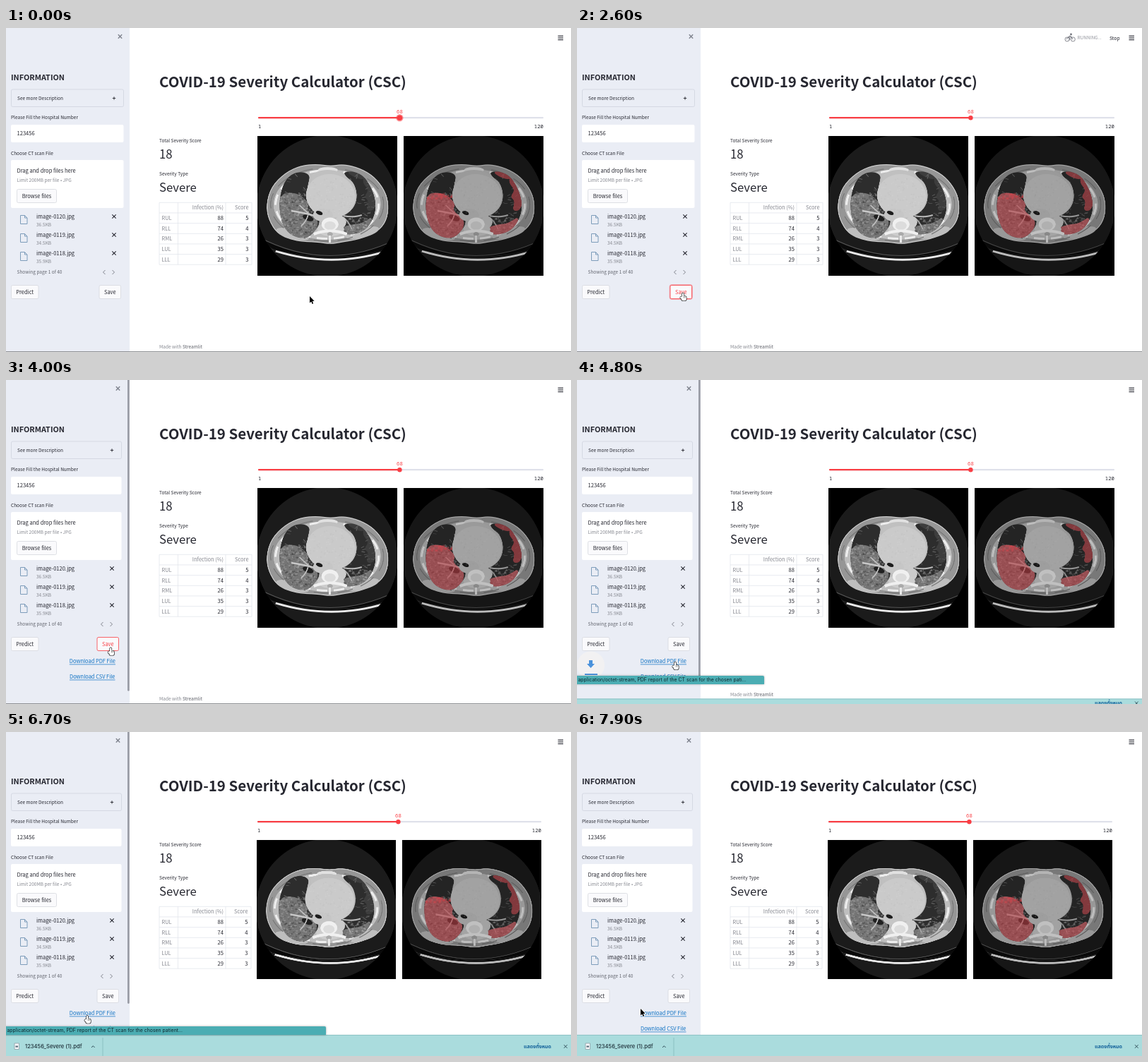
An HTML page with a canvas for the animation above (8000 ms loop, 800 by 459 pixels).

```html
<!DOCTYPE html>
<html lang="en">
<head>
<meta charset="utf-8">
<title>Severity calculator</title>
<style>
html, body { margin: 0; width: 100%; height: 100%; overflow: hidden; background: #fff; }
canvas { display: block; width: 800px; height: 459px; }
</style>
</head>
<body>
<canvas id="stage"></canvas>
<script>
const W = 800, H = 459, LOOP = 8000, STEP = 100;
const SANS = '"Noto Sans CJK JP","Noto Sans CJK SC","Noto Sans CJK","Open Sans",sans-serif';
const MONO = '"Noto Sans Mono","Liberation Mono",monospace';
const UI = 'Inter,Roboto,sans-serif';
const INK = '#262730', MUTED = '#85878f', RED = '#f93e44', LINK = '#0a6fc2', LINE = '#e3e6ec';
const CJK = 1.118; // Latin glyphs of the CJK face are drawn larger than nominal

const stage = document.getElementById('stage');
const dpr = window.devicePixelRatio || 1;
stage.width = W * dpr;
stage.height = H * dpr;
const c = stage.getContext('2d');

const clamp = v => Math.max(0, Math.min(1, v));
const ease = v => { v = clamp(v); return v * v * (3 - 2 * v); };
const part = (t, from, to) => clamp((t - from) / (to - from));

function text(s, x, y, size = 7.3, color = INK, o = {}) {
  const family = o.family || SANS;
  c.font = `${o.weight || 400} ${family === SANS ? size / CJK : size}px ${family}`;
  c.textAlign = o.align || 'left';
  c.fillStyle = color;
  c.fillText(s, x, y + size * 0.33);
  return c.measureText(s).width;
}

function rect(x, y, w, h, fill, stroke, r = 0) {
  c.beginPath();
  c.roundRect(x, y, w, h, r);
  if (fill) { c.fillStyle = fill; c.fill(); }
  if (stroke) { c.strokeStyle = stroke; c.lineWidth = 0.8; c.stroke(); }
}

function lines(color, width, ...paths) {
  c.strokeStyle = color;
  c.lineWidth = width;
  c.beginPath();
  for (const p of paths)
    for (let i = 0; i < p.length; i += 2) c[i ? 'lineTo' : 'moveTo'](p[i], p[i + 1]);
  c.stroke();
}

function dot(x, y, r, fill) {
  c.beginPath();
  c.arc(x, y, r, 0, 7);
  c.fillStyle = fill;
  c.fill();
}

function cross(x, y, r, color, width = 1.2) {
  lines(color, width, [x - r, y - r, x + r, y + r], [x + r, y - r, x - r, y + r]);
}

// ---- chest slices, painted once in a 198 x 198 space ----

const BODY = [13,97, 20,72, 40,52, 62,42, 85,40, 104,43, 122,40, 146,46, 166,58, 181,78, 186,98,
  183,120, 170,136, 145,146, 120,150, 104,153, 85,150, 55,149, 29,139, 16,118];
const LUNG_L = [66,51, 52,52, 40,62, 33,80, 31,100, 34,120, 42,136, 56,144, 70,145, 80,137,
  89,124, 86,112, 74,100, 69,84, 72,68, 75,56];
const LUNG_R = [122,51, 136,50, 150,56, 160,70, 167,88, 168,105, 162,122, 152,134, 136,140,
  123,139, 121,124, 117,115, 128,110, 138,100, 142,84, 137,66, 126,58];
const HAZE_L = [32,82, 50,80, 62,84, 74,96, 70,105, 78,112, 88,122, 80,140, 60,147, 40,137, 31,118];
const HAZE_R = [118,130, 135,125, 148,124, 164,113, 160,130, 140,142, 122,141];
const SIDE_R = [151,56, 161,70, 169,92, 165,106, 154,106, 158,92, 151,86, 158,77, 149,66];
const FRONT_R = [126,51, 140,49, 153,57, 150,62, 138,59];

function blob(g, p) {
  const n = p.length;
  const at = i => [p[i % n], p[(i + 1) % n]];
  const mid = i => { const [a, b] = at(i), [d, e] = at(i + 2); return [(a + d) / 2, (b + e) / 2]; };
  g.moveTo(...mid(0));
  for (let i = 2; i <= n; i += 2) g.quadraticCurveTo(...at(i), ...mid(i));
  g.closePath();
}

function paintScan(k, marked) {
  const cv = document.createElement('canvas');
  cv.width = cv.height = 396;
  const g = cv.getContext('2d');
  g.scale(2, 2);
  let seed = 11;
  const rnd = () => (seed = (seed * 16807) % 2147483647) / 2147483647;
  const grey = (v, a = 1) => { const s = Math.round(v * k); return `rgba(${s},${s},${s},${a})`; };
  const fill = (p, col) => { g.beginPath(); blob(g, p); g.fillStyle = col; g.fill(); };
  const oval = (x, y, rx, ry, col, rot = 0) => {
    g.beginPath(); g.ellipse(x, y, rx, ry, rot, 0, 7); g.fillStyle = col; g.fill();
  };
  const arc = (x0, y0, cx, cy, x1, y1, w, col) => {
    g.beginPath(); g.moveTo(x0, y0); g.quadraticCurveTo(cx, cy, x1, y1);
    g.lineWidth = w; g.strokeStyle = col; g.stroke();
  };

  g.fillStyle = '#000';
  g.fillRect(0, 0, 198, 198);
  g.save();
  g.beginPath();
  g.arc(99, 99, 100, 0, 7);
  g.clip();
  g.fillStyle = grey(27);
  g.fillRect(0, 0, 198, 198);

  // table
  g.beginPath();
  g.moveTo(0, 143);
  g.quadraticCurveTo(99, 196, 198, 146);
  g.lineTo(180, 164);
  g.quadraticCurveTo(104, 186, 26, 163);
  g.fillStyle = '#090909';
  g.fill();
  arc(0, 142, 99, 195, 198, 146, 1, grey(85));
  arc(26, 163, 104, 187, 180, 164, 3, grey(235));
  arc(20, 160, 104, 183, 186, 160, 0.6, grey(60));

  // chest wall and ribs
  fill(BODY, grey(150));
  g.lineWidth = 1.2;
  g.strokeStyle = grey(205);
  g.beginPath();
  blob(g, BODY);
  g.stroke();
  oval(99, 97, 76, 50, grey(190));
  oval(50, 139, 24, 7, grey(190), 0.25);
  oval(149, 137, 24, 7, grey(190), -0.25);
  for (const [rx, ry, w, dash] of [[73, 48.5, 3, [15, 9]], [80, 52, 1.2, [22, 12]]]) {
    g.beginPath();
    g.ellipse(99, 97, rx, ry, 0, 0, 7);
    g.setLineDash(dash);
    g.lineWidth = w;
    g.strokeStyle = grey(w > 2 ? 238 : 120);
    g.stroke();
  }
  g.setLineDash([]);
  oval(100, 48, 14, 4, grey(225));

  // lungs
  g.save();
  g.beginPath();
  blob(g, LUNG_L);
  blob(g, LUNG_R);
  g.fillStyle = grey(45);
  g.fill();
  g.clip();
  for (let i = 0; i < 150; i++) {
    const x = 30 + rnd() * 138, y = 50 + rnd() * 92, a = Math.atan2(y - 100, x - 99) + rnd() - 0.5;
    arc(x, y, x, y, x + Math.cos(a) * 5, y + Math.sin(a) * 5, 0.4 + rnd() * 0.7, grey(135, 0.65));
  }
  for (const z of [HAZE_L, HAZE_R]) fill(z, grey(130, 0.85));
  for (const z of [SIDE_R, FRONT_R]) fill(z, grey(80, 0.45));
  for (let i = 0; i < 560; i++) {
    const left = i < 400;
    const x = left ? 30 + rnd() * 58 : 118 + rnd() * 48, y = left ? 80 + rnd() * 66 : 116 + rnd() * 25;
    oval(x, y, 0.5 + rnd() * 1.5, 0.5 + rnd(), grey(rnd() < 0.45 ? 50 : 190, 0.35));
  }
  // airways and vessels around the hilum
  oval(78, 94, 7, 6, grey(22));
  oval(72, 116, 8, 4, grey(32), 0.4);
  arc(48, 106, 62, 108, 82, 113, 2.6, grey(200));
  arc(60, 98, 66, 104, 74, 111, 1.8, grey(190));
  arc(72, 112, 70, 120, 62, 128, 1.7, grey(190));
  arc(122, 113, 136, 116, 148, 112, 2, grey(185));
  arc(122, 115, 130, 122, 134, 132, 1.5, grey(175));
  if (marked) {
    const tint = 'rgba(212,66,74,.5)';
    for (const z of [HAZE_L, HAZE_R, SIDE_R, FRONT_R]) fill(z, tint);
    for (let i = 0; i < 26; i++) oval(34 + rnd() * 38, 82 + rnd() * 7, 2, 1.6, 'rgba(212,66,74,.35)');
  }
  g.restore();

  // heart, aorta, spine
  oval(100, 60, 24, 12, grey(192));
  oval(104, 85, 35, 31, grey(202), 0.15);
  oval(93, 112, 14, 9, grey(198));
  oval(88, 109, 5, 2.6, grey(28), 0.35);
  oval(118, 122, 8, 8.5, grey(203));
  oval(104, 132, 19, 10, grey(205));
  oval(103, 125, 12, 9.5, grey(240));
  oval(103, 127, 8, 6, grey(220));
  arc(80, 139, 103, 130, 127, 139, 4, grey(240));
  oval(103, 139, 4, 3, grey(170));
  arc(103, 141, 103, 145, 103, 151, 3, grey(235));
  for (let i = 0; i < 160; i++)
    oval(72 + rnd() * 64, 60 + rnd() * 50, 1, 1, grey(rnd() < 0.5 ? 180 : 220, 0.2));
  g.restore();
  return cv;
}

const plain = paintScan(1, false), marked = paintScan(0.8, true);

// ---- interface parts ----

function button(label, x, y, w, h, hot) {
  if (hot === 2) rect(x - 0.8, y - 0.8, w + 1.6, h + 1.6, null, 'rgba(249,62,68,.6)', 2.5);
  rect(x, y, w, h, '#fafafc', hot ? RED : '#d6d8df', 2);
  text(label, x + w / 2, y + h / 2 + 0.2, 8.35, hot ? RED : INK, { align: 'center' });
}

function fileIcon(x, y) {
  lines('#7d9cba', 1, [x + 6, y, x, y, x, y + 12, x + 9.5, y + 12, x + 9.5, y + 3.5, x + 6, y, x + 6, y + 3.5, x + 9.5, y + 3.5]);
}

function link(label, right, y) {
  const w = text(label, right, y, 8.35, LINK, { align: 'right' });
  lines(LINK, 0.7, [right - w, y + 4.4, right, y + 4.4]);
}

function sidebar(s) {
  const dx = s.links ? -3 : 0, right = 166.5 + dx;
  rect(0, 0, 175, H, '#eaedf5');
  cross(161.5 + dx, 12, 2.7, '#7e828d', 1.4);
  text('INFORMATION', 7, 69.5, 12.15, INK, { weight: 700 });
  rect(7.5, 87, right - 7.5, 24.5, null, '#d0d4df', 2);
  text('See more Description', 16, 99.5);
  const px = 153 + dx;
  lines(INK, 0.9, [px - 2.2, 99.5, px + 2.2, 99.5], [px, 97.3, px, 101.7]);
  text('Please Fill the Hospital Number', 7, 127);
  rect(7, 137, right - 7, 25, '#fff', null, 2);
  text('123456', 15.5, 149.7, 8.45);
  text('Choose CT scan File', 7, 177.5);
  rect(7, 187, right - 7, 68, '#fff', null, 2);
  text('Drag and drop files here', 15.5, 202, 8.4);
  text('Limit 200MB per file • JPG', 15.5, 215.5, 7.3, MUTED);
  button('Browse files', 15.5, 228.5, 56, 19);
  [['0120', '36.5'], ['0119', '34.5'], ['0118', '35.9']].forEach(([n, kb], i) => {
    const y = 267 + i * 26;
    fileIcon(20.5, y - 1.5);
    text(`image-${n}.jpg`, 43, y, 8.4);
    text(kb + 'KB', 43, y + 12, 7.3, MUTED);
    cross(px, y, 2.7, INK, 1.1);
  });
  text('Showing page 1 of 40', 15.5, 346, 7.3, '#62656e');
  const ax = 139 + dx;
  lines('#80838c', 1, [ax + 1.5, 343, ax - 1.5, 346, ax + 1.5, 349], [ax + 11.5, 343, ax + 14.5, 346, ax + 11.5, 349]);
  c.globalAlpha = s.fade;
  button('Predict', 7.5, 364.5, 38.5, 19);
  button('Save', 132 + dx, 364.5, 30.5, 19, s.hot);
  c.globalAlpha = 1;
  if (s.links) {
    link('Download PDF File', 155, 398.5);
    link('Download CSV File', 154.5, 420.5);
  }
  if (s.scroll) {
    c.globalAlpha = s.scroll;
    rect(172, -3, 2.8, s.top * s.top / 478 + 3, '#9b9ea7', null, 1.4);
    c.globalAlpha = 1;
  }
}

function results() {
  text('Total Severity Score', 217, 160);
  text('18', 217, 178.5, 18.7);
  text('Severity Type', 217, 207);
  text('Severe', 217, 225.5, 18.7);
}

function table(right) {
  const pitch = 14.65, top = 247.3, bottom = top + 6 * pitch;
  for (let i = 0; i <= 6; i++) lines(LINE, 0.8, [217, top + i * pitch, right, top + i * pitch]);
  for (const x of [217, 243.5, 311, right]) lines(LINE, 0.8, [x, top, x, bottom]);
  const end = { align: 'right' };
  text('Infection (%)', 308, 254.7, 8.3, MUTED, end);
  text('Score', right - 4.5, 254.7, 8.3, MUTED, end);
  [['RUL', 88, 5], ['RLL', 74, 4], ['RML', 26, 3], ['LUL', 35, 3], ['LLL', 29, 3]].forEach(([n, pct, score], i) => {
    const y = 269.3 + i * pitch;
    text(n, 220.5, y, 8.3, MUTED);
    text(pct, 308, y, 8.5, INK, { align: 'right', weight: 500 });
    text(score, right - 4.5, y, 8.5, INK, { align: 'right', weight: 500 });
  });
}

function slider(x0, x1, focus) {
  const x = x0 + (x1 - x0) * 0.496;
  rect(x0, 126, x1 - x0, 2.2, '#dfe1ea', null, 1);
  rect(x0, 126, x - x0, 2.2, RED, null, 1);
  if (focus) dot(x, 127.2, 5.2, 'rgba(249,62,68,.5)');
  dot(x, 127.2, focus ? 3.8 : 3.2, RED);
  const mono = align => ({ family: MONO, align });
  text('68', x, 119, 7.3, RED, mono('center'));
  text('1', x0, 139.5, 7.3, INK, mono('left'));
  text('120', x1, 139.5, 7.3, INK, mono('right'));
}

// little athletes of the busy indicator, around (698, 13)
const POSES = [
  [698, 9, [691, 17, 694, 16, 697, 17, 700, 16, 704, 17], [692, 14, 698, 12, 702, 14]],
  [699.5, 8.8, [699, 11, 697, 15, 700, 17, 699, 20], [697, 15, 695.5, 18, 692.5, 18], [694, 13, 696, 11, 699, 11, 701, 13.5, 704, 12.5]],
  [699.5, 9, [702, 16, 700, 13, 698, 11, 695.5, 13, 698, 15, 697, 17.5], [693, 16, 695.5, 13, 701, 13]],
  [698, 9.5, [698, 11, 698, 15, 695.5, 19], [698, 15, 700.5, 19], [698, 12, 693.5, 8], [698, 12, 702.5, 8], [690.5, 8, 705.5, 8]],
];

function busy(t) {
  const i = Math.floor(t / STEP) % POSES.length;
  const [hx, hy, ...limbs] = POSES[i];
  dot(hx, hy, 1.4, '#6f717a');
  lines('#6f717a', 1, ...limbs);
  if (i === 2) {
    c.lineWidth = 0.8;
    for (const x of [694, 702.3]) { c.beginPath(); c.arc(x, 16, 3, 0, 7); c.stroke(); }
  }
  text('RUNNING...', 708.5, 14, 7.2, '#92949c');
  text('Stop', 754, 14, 7.6, INK, { weight: 500 });
}

function page(s) {
  rect(175, 0, 625, H, '#fff');
  for (const y of [11.3, 14, 16.7]) lines('#33343d', 1.2, [781.5, y, 789, y]);
  if (s.busy) busy(s.t);
  text('COVID-19 Severity Calculator (CSC)', 217, 76.5, 22.9, INK, { weight: 700 });
  const left = s.narrow ? 355 : 356, second = s.narrow ? 561 : 563, size = s.narrow ? 197 : 198;
  slider(left + 1, second + size, s.focus);
  c.globalAlpha = s.fade;
  results();
  table(s.narrow ? 347 : 348);
  c.drawImage(plain, left - 0.3, 153, size, size);
  c.globalAlpha = 1;
  c.drawImage(marked, second - 0.3, 153, size, size);
  if (s.top > 440) {
    const y = 452 - (H - s.top) * 0.8;
    const w = text('Made with ', 217, y, 7.3, MUTED);
    text('Streamlit', 217 + w, y, 7.3, '#5b5d66', { weight: 500 });
  }
  rect(0, 458, W, 1, '#8e9094');
}

function shelf(s) {
  if (s.top >= H) return;
  rect(0, s.top, W, H - s.top, '#aadcdd');
  lines('#83babd', 0.8, [0, s.top + 0.4, W, s.top + 0.4]);
  const y = 445.5 + (s.top - 429) * 0.55;
  cross(792.3, y, 2.3, '#31505a', 1);
  text('แสดงทั้งหมด', 772, y, 7, '#14639b', { family: '"Noto Sans Thai","Noto Sans",sans-serif', weight: 700, align: 'right' });
  if (!s.narrow) return;
  lines('#83babd', 0.8, [137, 433, 137, H]);
  rect(12, 441, 6.5, 8.5, '#f6f8fa', '#8e9da5');
  rect(13.5, 444.5, 3.5, 2.2, '#5d6f7d');
  if (s.ring) {
    c.beginPath();
    c.arc(15.2, 445.3, 7.2, 0, 7);
    c.strokeStyle = '#5d7f8b';
    c.lineWidth = 0.9;
    c.stroke();
  }
  text('123456_Severe (1).pdf', 27, 445.7, 7.6, '#1d2f38', { family: UI, weight: 500 });
  lines('#31505a', 1, [121, 447, 123.3, 444.7, 125.6, 447]);
}

function bubble(s) {
  if (!s.bubble) return;
  const w = 265 + 188 * s.wide, y = s.bubbleTop;
  c.save();
  c.globalAlpha = s.bubble;
  c.shadowColor = 'rgba(0,0,0,.35)';
  c.shadowBlur = 3 * dpr;
  rect(-3, y, w + 3, 12, '#4badb3', null, [0, 2, 0, 0]);
  c.restore();
  c.globalAlpha = s.bubble;
  const tail = s.wide > 0 ? 'ent...' : '...';
  text('application/octet-stream, PDF report of the CT scan for the chosen pati' + tail, 1.5, y + 6.1, 6.9, '#10292f', { family: UI });
  c.globalAlpha = 1;
}

function dropArrow(t) {
  if (t < 4700 || t >= 5100) return;
  const y = 404 + (t - 4800) / 10;
  c.globalAlpha = 1 - part(t, 4800, 5200);
  dot(19.5, y, 19.5, 'rgba(248,246,240,.6)');
  c.fillStyle = '#4b92dc';
  c.beginPath();
  for (const [x, dy] of [[17, -7], [22, -7], [22, -2], [25, -2], [19.5, 4], [14, -2], [17, -2]]) c.lineTo(x, y + dy);
  c.fill();
  rect(11, y + 12, 18, 2, '#4b92dc');
  c.globalAlpha = 1;
}

// ---- pointer ----

const ROUTE = [[700, 430, 380], [1700, 150, 376], [3900, 150, 376], [4300, 139, 400],
  [6600, 139, 400], [7000, -14, 416], [7400, -14, 400], [7800, 90, 392]];

function pointerAt(t) {
  const i = ROUTE.findIndex(k => k[0] > t);
  if (i === 0) return ROUTE[0].slice(1);
  if (i < 0) return ROUTE[ROUTE.length - 1].slice(1);
  const [t0, x0, y0] = ROUTE[i - 1], [t1, x1, y1] = ROUTE[i];
  const p = ease(part(t, t0, t1));
  return [x0 + (x1 - x0) * p, y0 + (y1 - y0) * p];
}

function drawPointer(x, y, hand) {
  c.save();
  c.translate(x, y);
  c.beginPath();
  if (hand) {
    c.roundRect(-1.2, -0.5, 2.4, 7, 1.2);
    c.roundRect(-2, 3.8, 6.8, 6.4, 2);
    c.roundRect(-3.8, 4.6, 3, 2.8, 1.2);
  } else {
    for (const p of [[0, 0], [0, 9.6], [2.2, 7.6], [3.6, 11], [5.2, 10.3], [3.8, 7], [6.6, 6.8]]) c.lineTo(...p);
    c.closePath();
  }
  c.lineJoin = 'round';
  c.strokeStyle = hand ? '#111' : '#fff';
  c.lineWidth = 1.3;
  c.stroke();
  c.fillStyle = hand ? '#fff' : '#000';
  c.fill();
  if (hand) lines('#111', 0.5, [1.2, 4.2, 1.2, 6.5], [3, 4.5, 3, 6.5]);
  c.restore();
}

function draw(t) {
  const [x, y] = pointerAt(t);
  const inside = (x0, y0, x1, y1) => x >= x0 && x <= x1 && y >= y0 && y <= y1;
  const overSave = inside(130, 364, 163, 384), overLink = t >= 3500 && inside(90, 393, 155, 404);
  const up = part(t, 4700, 5100);
  const s = {
    t,
    fade: t >= 2800 && t < 3400 ? 1 - 0.35 * part(t, 2800, 3300) ** 2 : 1,
    busy: t >= 2300 && t < 3500,
    focus: t < 2000,
    hot: overSave ? (t >= 2000 && t < 3500 ? 2 : 1) : 0,
    links: t >= 3500,
    top: H - 30 * up,
    narrow: up === 1,
    scroll: t >= 3500 ? 1 - part(t, 6700, 7000) : 0,
    ring: t < 6500,
    bubble: t >= 4200 ? 1 - part(t, 6700, 7000) : 0,
    wide: ease(part(t, 5400, 5700)),
    bubbleTop: t < 4800 ? 447 : t < 4900 ? 419 : 417,
  };
  c.setTransform(dpr, 0, 0, dpr, 0, 0);
  page(s);
  sidebar(s);
  rect(0, 458, 175, 1, '#8e9094');
  dropArrow(t);
  shelf(s);
  bubble(s);
  drawPointer(x, y, overSave || overLink);
}

const start = performance.now();
function tick() {
  const t = (performance.now() - start) % LOOP;
  draw(Math.floor(t / STEP) * STEP);
  requestAnimationFrame(tick);
}
tick();
</script>
</body>
</html>
```
